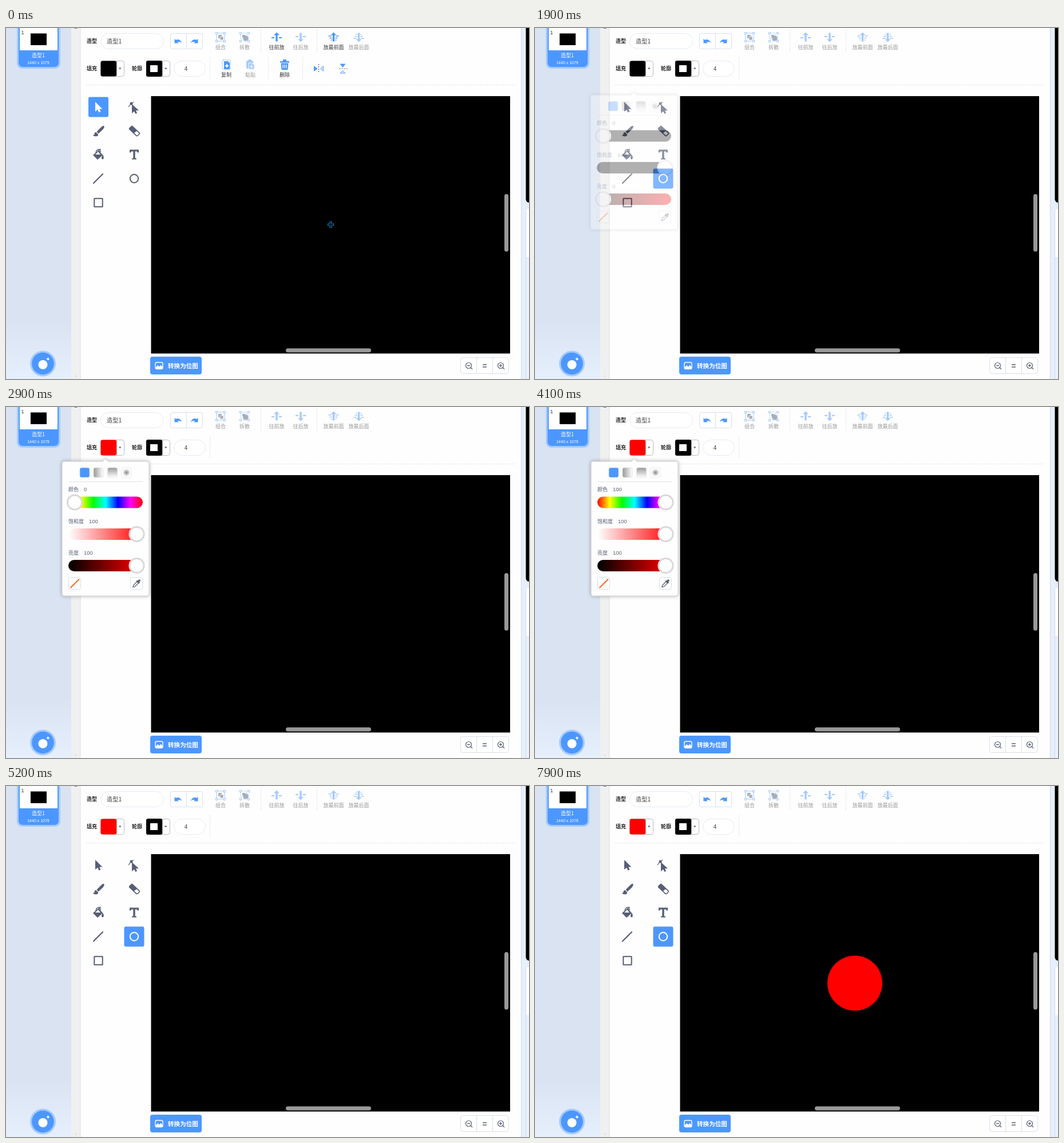
Animation, 914 px wide and 613 px high, one loop 8 s. Source, as an HTML page:

```html
<!DOCTYPE html>
<html lang="zh">
<head>
<meta charset="utf-8">
<style>
html, body { margin: 0; width: 100%; height: 100%; overflow: hidden; background: #fff; }
svg { display: block; width: 914px; height: 613px; font-family: "Noto Sans CJK SC", "Noto Sans CJK", "Liberation Sans", sans-serif; }
.num { font-family: "Liberation Sans", Arial, sans-serif; }
</style>
</head>
<body>
<svg id="stage" viewBox="0 0 914 613" xmlns="http://www.w3.org/2000/svg"></svg>
<script>
const BLUE = '#4c97ff', INK = '#575e75', EDGE = '#d8dfea';

// Markup helpers
const rect = (x, y, w, h, fill, r = 0, more = '') =>
  `<rect x="${x}" y="${y}" width="${w}" height="${h}" rx="${r}" fill="${fill}" ${more}/>`;
const box = (x, y, w, h, r, stroke = EDGE, fill = '#fff') =>
  rect(x + .5, y + .5, w - 1, h - 1, fill, r, `stroke="${stroke}"`);
const path = (d, fill = 'none', stroke = 'none', width = 1, more = '') =>
  `<path d="${d}" fill="${fill}" stroke="${stroke}" stroke-width="${width}" ${more}/>`;
const circle = (x, y, r, fill, more = '') => `<circle cx="${x}" cy="${y}" r="${r}" fill="${fill}" ${more}/>`;
const text = (s, x, cy, size, fill = '#222', more = '') =>
  `<text x="${x}" y="${cy + size * .37}" font-size="${size}" fill="${fill}" ${more}>${s}</text>`;
const group = (body, more) => `<g ${more}>${body}</g>`;
const move = (x, y, body, more = '') => group(body, `transform="translate(${x} ${y})" ${more}`);
const BOLD = 'font-weight="700"', MID = 'text-anchor="middle"';
const dash = d => path(d, 'none', '#d9dde5', 1, 'stroke-dasharray="2 2"');
const gradient = (id, stops, dir = '') => `<linearGradient id="${id}" ${dir}>${stops
  .map((c, i) => `<stop offset="${i / (stops.length - 1)}" stop-color="${c}"/>`).join('')}</linearGradient>`;

// Toolbar icons, centred on 0,0
const corners = [[-7, -7], [7, -7], [-7, 7], [7, 7]];
const handles = corners.map(([x, y]) => rect(x - 1.5, y - 1.5, 3, 3, '#fff', 0, `stroke="${BLUE}"`)).join('');
const icons = {
  group: rect(-7, -7, 14, 14, 'none', 0, `stroke="${BLUE}"`) + handles +
    rect(-4, -4, 6, 6, INK, 1) + rect(-1, -1, 6, 6, INK, 1, 'stroke="#fff" stroke-width=".7"'),
  ungroup: path('M-7-7H3V3H-7ZM-2-2H7V7H-2Z', 'none', BLUE, 1, 'stroke-dasharray="2 1"') + handles +
    circle(2, 2, 4.5, INK) + rect(-4, -4, 5, 5, INK, 1),
  step: path('M0-8.5L5-3.5H1.7V7.5H-1.7V-3.5H-5Z', BLUE) + path('M-9 1H-4M4 1H9', 'none', BLUE, 2),
  most: path('M0-8.5L5-3.5H1.7V7.5H-1.7V-3.5H-5Z', BLUE) +
    path('M-9-2H-4M4-2H9M-7 1.5H-3M3 1.5H7M-5 5H-3M3 5H5', 'none', BLUE, 1.6),
  copy: rect(-7, -8, 14, 16, 'none', 2, `stroke="${BLUE}" stroke-dasharray="1.5 1.5"`) +
    path('M-4-6H3L6-3V8H-4Z', BLUE) + path('M-2 2H4M1-1V5', 'none', '#fff', 1.8),
  paste: rect(-7, -7, 12, 14, BLUE, 2) + rect(-3.5, -9, 5, 3, BLUE, 1) +
    path('M-3-3H3L7 1V8H-3Z', BLUE, '#fff') + path('M2 0V4M0 3L2 5L4 3', 'none', '#fff', 1.3),
  trash: path('M-8-6H-3V-9H3V-6H8V-3.5H-8ZM-6.5-2.5H6.5L5.5 9H-5.5Z', BLUE) +
    path('M-3 0V6M0 0V6M3 0V6', 'none', '#fff', 1.3),
  flip: path('M-8.5-5L-2 0L-8.5 5Z', BLUE) + path('M8-4.5L3 0L8 4.5Z', '#c9e0ff', BLUE, .8) +
    path('M0-8V8', 'none', INK, 1.2, 'stroke-dasharray="2 2"'),
};
const button = (icon, label, x, y, opacity = 1, turn = 0, id = '') =>
  move(x, y, group(icons[icon], `transform="rotate(${turn})"`) +
    text(label, 0, 18, 9, '#333', MID), `opacity="${opacity}" id="${id}"`);

// Drawing tools, centred on 0,0
const tools = {
  pointer: path('M-5.5-9V8L-1.5 4.5L1 9.5L4 8L1.7 3.5H7Z', 'currentColor'),
  reshape: path('M-3-5V11L1 7.5L3.5 12L6 10.5L4 6H9Z', INK) +
    path('M-9 0Q-6-5 0-9', 'none', INK, 1.3) + circle(-4, -6, 2.5, INK),
  brush: path('M10-9Q8-10 4-6L-3 1L0 4.5L7-2Q11-6 10-9Z', INK) +
    path('M-4 2Q-7 2-7 5Q-7 7-10 7Q-7 10-3 9Q1 8-1 5Z', INK),
  eraser: path('M-3-8L9 3Q10 4 9 5L6 8Q5 9 4 8L-8-3Q-9-4-8-5L-5-8Q-4-9-3-8Z', 'none', INK, 1.7) +
    path('M-4-8.5L5-.5L-1 4L-9-4Z', INK),
  bucket: path('M-9 1L1-8L8 1L-1 9Z', INK) + path('M-5 0L0-5L4 0Z', '#fff') +
    path('M-4-3Q-3-9 1-9L5-5M2-9L5-9', 'none', INK, 1.5) + path('M8 0Q11 5 9 8Q6 9 6 5Z', INK),
  type: path('M-8-8.5H8V-3.5H6L5-5.5H1.7V6L4 7V8.5H-4V7L-1.7 6V-5.5H-5L-6-3.5H-8Z', INK),
  line: path('M-8 8L8-8', 'none', INK, 2.2, 'stroke-linecap="round"'),
  oval: circle(0, 0, 7.2, 'none', 'stroke="currentColor" stroke-width="2"'),
  square: rect(-7.2, -7.2, 14.4, 14.4, 'none', .5, `stroke="${INK}" stroke-width="2"`),
};
const tool = (name, x, y) => move(x, y, tools[name], `id="${name}" color="${INK}"`);
const highlight = (id, x, y) => rect(x - 17.5, y - 17.5, 35, 35, BLUE, 3, `id="${id}"`);

const undo = path('M-6.5 3.5V-4L-4-2Q2-5.5 6.5 3Q2-.2-1 1.5L.8 3.5Z', BLUE);
const lens = (x, sign) => move(x, 590, circle(-.5, -.5, 5, 'none', `stroke="${INK}" stroke-width="1.2"`) +
  path('M3 3L6 6M-3-.5H2' + sign, 'none', INK, 1.3));
const swatch = (x, fill) => box(x, 57, 42, 28, 4, '#bbb') + fill +
  path(`M${x + 28.5} 57V85`, 'none', '#bbb') + path(`M${x + 32} 69.5H${x + 36.5}L${x + 34.2} 72.5Z`, INK);

const sidebar = rect(0, 0, 114, 613, 'url(#side)') + rect(114, 0, 16, 613, '#f0f0f1') +
  path('M119 1H125L122-2Z', '#777') + path('M120 607H124L122 610Z', '#ddd') +
  rect(19, -10, 76, 81, '#a6cafc', 9) + rect(22, -6, 70, 74, BLUE, 7) + rect(24, 0, 66, 39, '#fff') +
  rect(43, 9.5, 28, 20.5, '#000') + text('1', 26.5, 8, 9, '#333', 'class="num"') +
  text('造型1', 56.5, 48, 9, '#fff', MID) + text('1440 x 1079', 56.5, 60, 7, '#fff', MID + ' class="num"') +
  circle(64.5, 586, 22.5, '#a6cafc') + circle(64.5, 586, 19.3, BLUE) +
  circle(64.5, 588, 8, '#fff') +
  path('M73.5 574.5Q74 578 77 578Q74 578.5 73.5 581.5Q73 578.5 70 578Q73 577.5 73.5 574.5Z', '#fff');

const toolbar = text('造型', 141, 23, 9, '#222', BOLD) + box(165, 9, 111, 28, 14, '#e6ebf4') +
  text('造型1', 176, 23, 10.3, '#444') +
  box(287, 9, 57, 28, 3) + path('M315.5 9V37', 'none', EDGE) +
  move(301, 23, undo) + group(undo, 'transform="translate(329 23) scale(-1 1)"') +
  button('group', '组合', 375, 16, .5) + button('ungroup', '拆散', 417, 16, .5) +
  button('step', '往前放', 473, 16, 1, 0, 'forward') +
  button('step', '往后放', 515, 16, .5, 180) +
  button('most', '放最前面', 572.5, 16, 1, 0, 'front') +
  button('most', '放最后面', 616.5, 16, .5, 180) +
  dash('M445.5 3V43M543.5 3V43M356.5 51V91M140 99.5H889') +
  text('填充', 141, 71, 9, '#222', BOLD) + text('轮廓', 220, 71, 9, '#222', BOLD) +
  swatch(165, rect(165.5, 57.5, 27.5, 27, '#000', 3, 'id="fill"')) +
  swatch(245, rect(245, 57, 28, 28, '#000', 3) + rect(252, 65, 13, 12, '#fff')) +
  box(293, 57, 56, 28, 14, '#e6ebf4') + text('4', 314.5, 71, 10, '#444', MID + ' class="num"') +
  group(button('copy', '复制', 385, 64) + button('paste', '粘贴', 427, 64, .5) +
    button('trash', '删除', 487, 64) + move(546.5, 71, icons.flip) +
    group(icons.flip, 'transform="translate(588.5 71) rotate(90)"') +
    dash('M458.5 51V91M518.5 51V91'), 'id="editing"');

const palette = highlight('pickOn', 161.5, 138) + highlight('ovalOn', 224, 263) +
  tool('pointer', 161.5, 138) + tool('reshape', 223, 138) + tool('brush', 161.5, 180) +
  tool('eraser', 224, 180) + tool('bucket', 161, 221) + tool('type', 224, 221) +
  tool('line', 161, 263) + tool('oval', 224, 263) + tool('square', 161.5, 305);

const canvas = rect(253.5, 119, 627.5, 449.5, '#000') + circle(0, 0, 0, '#f00', 'id="ball"') +
  path('M566 338.5H569V342H572.5V345H569V348.5H566V345H562.5V342H566Z', 'none', '#0d83bd', 1.1, 'id="cross"') +
  rect(871, 290, 7, 100.5, '#999', 3.5) + rect(489, 559.5, 149, 7, '#999', 3.5) +
  rect(252, 574, 90, 31, BLUE, 4) +
  rect(261, 584, 13, 11.5, 'none', 2.5, 'stroke="#fff" stroke-width="1.4"') +
  path('M261.5 593L265 589L268 591.5L270.5 588.5L273.5 592V595H262Z', '#fff') +
  text('转换为位图', 283, 590.5, 10.6, '#fff', BOLD) +
  box(794, 575, 85, 29, 4) + path('M822.5 575V604M850.5 575V604', 'none', EDGE) +
  lens(809, '') + lens(865, 'M-.5-3V2') + path('M833 588H840M833 592H840', 'none', INK, 1.5);

const slider = (name, label, valueX, y) =>
  text(label, 109, y - 22.5, 9, INK, 'font-weight="500"') +
  `<text id="${name}Value" class="num" x="${valueX}" y="${y - 19.2}" font-size="9.5" fill="${INK}"></text>` +
  rect(109, y - 10, 130, 20, `url(#${name})`, 10) +
  circle(0, y, 12.6, '#fff', `id="${name}Knob" stroke="#d9d9d9" stroke-width="3"`);
const mode = (x, fill) => rect(x, 106, 17, 17, fill, 3, 'stroke="#ddd" stroke-width=".7"');
const popup = group(
  path('M101 95H168.5L173.5 90.5L178.5 95H247Q250 95 250 98V327Q250 330 247 330H101Q98 330 98 327V98Q98 95 101 95Z',
    '#fefefe', '#c8c8c8', 1, 'filter="url(#shadow)"') +
  mode(129, BLUE) + mode(153, 'url(#across)') + mode(177.5, 'url(#down)') + mode(202, 'url(#radial)') +
  path('M109 130.5H239', 'none', '#dfe3ea') +
  slider('hue', '颜色', 136, 166.5) + slider('sat', '饱和度', 145, 222) + slider('bri', '亮度', 136, 277) +
  box(109, 297, 22, 22, 3) + path('M112.5 316L128 300.5', 'none', '#ff661a', 2) +
  box(217, 297, 22, 22, 3) +
  path('M222 314.5L223 311L229 305L231.5 307.5L225.5 313.5Z', 'none', INK, 1.3) +
  path('M227.5 304L229 302.5L230 303.5L232 301.5Q235 300.5 235 303.5L233 305.5L234 306.5L232.5 308.5Z', INK),
  'id="popup"');

const stage = document.getElementById('stage');
stage.innerHTML = `<defs>
  ${gradient('side', ['#d9e3f2', '#d9e3f2', '#d9e3f2', '#d9e3f2', '#d9e3f2', '#d9e3f2', '#e6effc'], 'x2="0" y2="1"')}
  ${gradient('across', ['#999', '#fff'])}${gradient('down', ['#999', '#fff'], 'x2="0" y2="1"')}
  <radialGradient id="radial"><stop stop-color="#888"/><stop offset=".8" stop-color="#fff"/></radialGradient>
  ${gradient('hue', Array(7).fill('#000'))}${gradient('sat', ['#000', '#000'])}${gradient('bri', ['#000', '#000'])}
  <filter id="shadow" x="-10%" y="-10%" width="120%" height="120%">
    <feDropShadow dx="0" dy="0" stdDeviation="3" flood-opacity=".3"/></filter>
</defs>` +
  rect(0, 0, 914, 613, '#fefefe') + sidebar +
  path('M130 0V613', 'none', '#d9dfe9') +
  rect(900, 0, 14, 613, '#e6effc') + path('M900.5 0V613', 'none', '#cfd9e8') +
  rect(908.5, -10, 20, 315, '#000', 6) + box(908, 314, 30, 320, 7, '#cfd9e8', '#e9f1fc') +
  path('M914 315H915V401H909V321Q909 315 915 315Z', '#fff') + path('M909 401.5H914', 'none', '#d5deea') +
  toolbar + palette + canvas + popup;

// Motion
const $ = id => document.getElementById(id);
const set = (id, attrs) => { for (const k in attrs) $(id).setAttribute(k, attrs[k]); };
const latest = (t, keys) => keys.reduce((now, [start, ...v]) => t >= start ? v : now, keys[0].slice(1));

const hsv = (h, s, v) => {
  const channel = n => {
    const k = (n + h / 60) % 6;
    return Math.round(255 * v * (1 - s * Math.max(0, Math.min(k, 4 - k, 1))));
  };
  return `rgb(${channel(5)},${channel(3)},${channel(1)})`;
};
const paint = (id, colours) => [...$(id).children].forEach((stop, i) => stop.setAttribute('stop-color', colours[i]));
const setSlider = (name, value) => {
  set(name + 'Knob', { cx: 120 + 1.085 * value });
  $(name + 'Value').textContent = value;
};

function draw(t) {
  const [switched] = latest(t, [[0, 0], [900, .5], [1000, .9], [1100, 1]]);
  set('editing', { opacity: 1 - switched });
  set('forward', { opacity: 1 - switched / 2 });
  set('front', { opacity: 1 - switched / 2 });
  set('cross', { opacity: switched ? 0 : 1 });
  set('pickOn', { opacity: 1 - switched });
  set('ovalOn', { opacity: switched });
  set('pointer', { color: switched ? INK : '#fff' });
  set('oval', { color: switched ? '#fff' : INK });

  const [shown, drop] = latest(t, [[0, 0, 0], [1900, .3, 22], [2000, .8, 8], [2100, 1, 1.5], [2200, 1, .7],
    [2300, 1, .2], [2400, 1, 0], [5000, .7, 4], [5100, .2, 18], [5200, 0, 0]]);
  set('popup', { opacity: shown, transform: `translate(${-Math.min(1, drop)} ${drop})` });

  const [bright] = latest(t, [[0, 0], [2800, 62], [2900, 100]]);
  const [hue] = latest(t, [[0, 0], [3800, 22], [3900, 60], [4000, 90], [4100, 100]]);
  const h = hue * 3.6, v = bright / 100;
  setSlider('hue', hue);
  setSlider('sat', 100);
  setSlider('bri', bright);
  paint('hue', [0, 60, 120, 180, 240, 300, 360].map(a => hsv(a, 1, v)));
  paint('sat', [hsv(h, 0, v), hsv(h, 1, v)]);
  paint('bri', ['#000', hsv(h, 1, 1)]);
  set('fill', { fill: hsv(h, 1, v) });

  const [size] = latest(t, [[0, 0], [6900, 24], [7000, 58], [7100, 82], [7200, 91],
    [7400, 93], [7500, 95], [7600, 97], [7900, 96]]);
  set('ball', { cx: 511 + size / 2, cy: 296.3 + size / 2, r: size / 2 });
}

const start = performance.now();
function tick() {
  draw((performance.now() - start) % 8000);
  requestAnimationFrame(tick);
}
tick();
</script>
</body>
</html>
```
